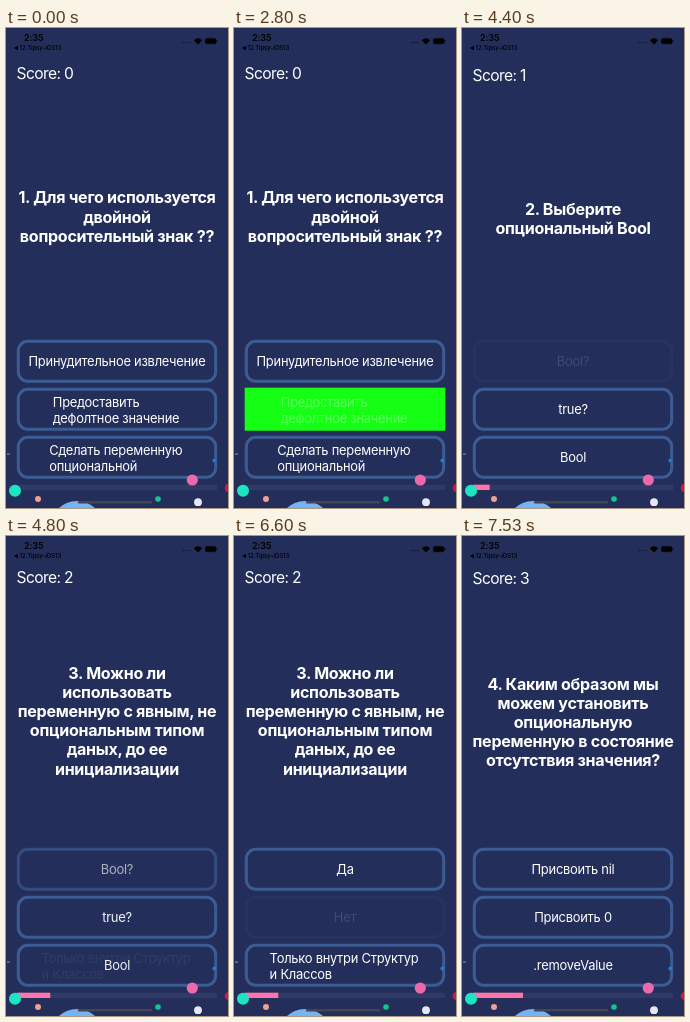
An HTML page for the animation above (8000 ms loop, 222x480 px).

```html
<!DOCTYPE html>
<html lang="ru">
<head>
<meta charset="utf-8">
<title>Quiz</title>
<style>
  html, body { margin: 0; width: 100%; height: 100%; overflow: hidden; background: #232e5b; }
  svg { display: block; width: 100%; height: 100%; }
  text { font-family: Inter, "Open Sans", sans-serif; font-optical-sizing: none; fill: #fff; white-space: pre; }
  .score { font-size: 15.6px; letter-spacing: -.039em; }
  .question { font-size: 16.09px; font-weight: 700; letter-spacing: -.018em; text-anchor: middle; }
  .answer { font-size: 12.9px; letter-spacing: -.018em; }
  .status text { fill: #000; }
</style>
</head>
<body>
<svg id="stage" viewBox="0 0 222 480" xmlns="http://www.w3.org/2000/svg">
  <rect width="222" height="480" fill="#232e5b"/>
  <g class="status" fill="#000">
    <text x="18" y="12.8" font-size="9" font-weight="600" letter-spacing="-.1">2:35</text>
    <path d="M8 20l4-2.2v4.4z"/>
    <text x="13.5" y="22.2" font-size="6.1" font-weight="500" letter-spacing="-.1">12.Tipsy-iOS13</text>
    <g opacity=".45">
      <circle cx="177" cy="14.5" r=".8"/><circle cx="179.4" cy="14.5" r=".8"/>
      <circle cx="181.8" cy="14.5" r=".8"/><circle cx="184.2" cy="14.5" r=".8"/>
    </g>
    <path d="M187.8 12.2q4.2-3.8 8.4 0l-4.2 4.4z"/>
    <rect x="199.4" y="10.4" width="10.6" height="5.4" rx="1.6" stroke="#000" stroke-width=".5"/>
    <rect x="210.6" y="12" width=".8" height="2.2" rx=".4"/>
  </g>
  <g id="questions"></g>
  <g id="buttons"></g>
  <rect x="11" y="456.7" width="200" height="5.3" fill="#303a64"/>
  <rect id="bar" x="11" y="456.7" width="0" height="5.3" fill="#ff75a8"/>
  <g id="bubbles"></g>
  <rect x="72" y="473" width="74" height="2.6" rx="1.3" fill="#45454f"/>
</svg>
<script>
const LOOP = 8000, FADE = 470, DIM = 0.13;
const $ = id => document.getElementById(id);

// Answers: a string is centred, an array is [left edge, line, line].
const pages = [
  { scoreY: 45.5, midY: 188.9,
    lines: ["1. Для чего используется", "двойной", "вопросительный знак ??"],
    answers: ["Принудительное извлечение",
      [46.8, "Предоставить", "дефолтное значение"],
      [43.2, "Сделать переменную", "опциональной"]] },
  { scoreY: 47.3, midY: 190.4,
    lines: ["2. Выберите", "опциональный Bool"],
    answers: ["Bool?", "true?", "Bool"] },
  { scoreY: 41.5, midY: 184.8,
    lines: ["3. Можно ли", "использовать", "переменную с явным, не",
      "опциональным типом", "даных, до ее", "инициализации"],
    answers: ["Да", "Нет", [35.6, "Только внутри Структур", "и Классов"]] },
  { scoreY: 42.6, midY: 186.2,
    lines: ["4. Каким образом мы", "можем установить", "опциональную",
      "переменную в состояние", "отсутствия значения?"],
    answers: ["Присвоить nil", "Присвоить 0", ".removeValue"] }
];

// Touch down, release (turns green), move on to the next page.
const taps = [
  { button: 1, down: 2530, up: 2670, next: 2870 },
  { button: 0, down: 4400, up: 4530, next: 4730 },
  { button: 1, down: 6600, up: 6740, next: 6940 }
];

const bubbles = [
  [71, 499.6, 26.6, "#74b4f5"], [9, 462.8, 6, "#1de5c4"], [186.3, 452, 5.6, "#ec6aab"],
  [32, 471, 3, "#f0a08f"], [152, 471, 2.8, "#14c78f"], [192, 474.2, 3.9, "#e6e6f5"],
  [223, 460, 4.4, "#d3134a"], [208.3, 432.5, 2, "#1f7dc4"]
];

function add(parent, tag, attrs = {}, content = "") {
  const el = document.createElementNS("http://www.w3.org/2000/svg", tag);
  for (const key in attrs) el.setAttribute(key, attrs[key]);
  el.textContent = content;
  return parent.appendChild(el);
}

function addAnswer(parent, answer, midY) {
  const g = add(parent, "g");
  if (typeof answer === "string") {
    add(g, "text", { class: "answer", x: 111, y: midY + 4.8, "text-anchor": "middle" }, answer);
  } else {
    const [x, ...lines] = answer;
    lines.forEach((line, i) =>
      add(g, "text", { class: "answer", x, y: midY - 2.7 + i * 16 }, line));
  }
  return g;
}

for (const [cx, cy, r, fill] of bubbles) add($("bubbles"), "circle", { cx, cy, r, fill });
add($("bubbles"), "rect", { x: 1, y: 425.6, width: 3, height: 1, fill: "#8c94b4" });

const views = pages.map((page, n) => {
  const g = add($("questions"), "g");
  add(g, "text", { class: "score", x: 10.5, y: page.scoreY + 5.6 }, "Score: " + n);
  page.lines.forEach((line, i) => add(g, "text", {
    class: "question", x: 111,
    y: page.midY + 5.7 + (i - (page.lines.length - 1) / 2) * 19.2
  }, line));
  return g;
});

const buttons = [0, 1, 2].map(i => {
  const top = 312 + i * 48;
  const border = add($("buttons"), "rect", { x: 12.3, y: top + 1.3, width: 197.4, height: 40,
    rx: 9.5, fill: "none", stroke: "#3d5c93", "stroke-width": 3 });
  const fill = add($("buttons"), "rect",
    { x: 10.7, y: top - 0.3, width: 200.6, height: 43, fill: "#14ff14" });
  const label = add($("buttons"), "g");
  const titles = pages.map(page => addAnswer(label, page.answers[i], top + 21.3));
  return { border, fill, label, titles };
});

const ease = p => {
  p = Math.min(1, Math.max(0, p));
  return p * p * (3 - 2 * p);
};

function pressAlpha(i, t) {
  const tap = taps.filter(s => s.button === i && t >= s.down).pop();
  return tap ? DIM + (1 - DIM) * ease((t - tap.up) / FADE) : 1;
}

const setAlpha = (el, a) => el.setAttribute("opacity", a);

function draw(t) {
  const page = taps.filter(s => t >= s.next).length;
  const mix = page ? ease((t - taps[page - 1].next) / FADE) : 1;
  views.forEach((g, n) => setAlpha(g, n === page ? 1 : 0));
  $("bar").setAttribute("width", page * 200 / 12);
  buttons.forEach(({ border, fill, label, titles }, i) => {
    const green = taps.some(s => s.button === i && t >= s.up && t < s.next);
    const alpha = pressAlpha(i, t);
    setAlpha(fill, green ? 1 : 0);
    setAlpha(border, alpha);
    setAlpha(label, alpha);
    titles.forEach((g, n) => setAlpha(g, n === page ? mix : n === page - 1 ? 1 - mix : 0));
  });
}

function tick() {
  draw(performance.now() % LOOP);
  requestAnimationFrame(tick);
}
tick();
</script>
</body>
</html>
```
